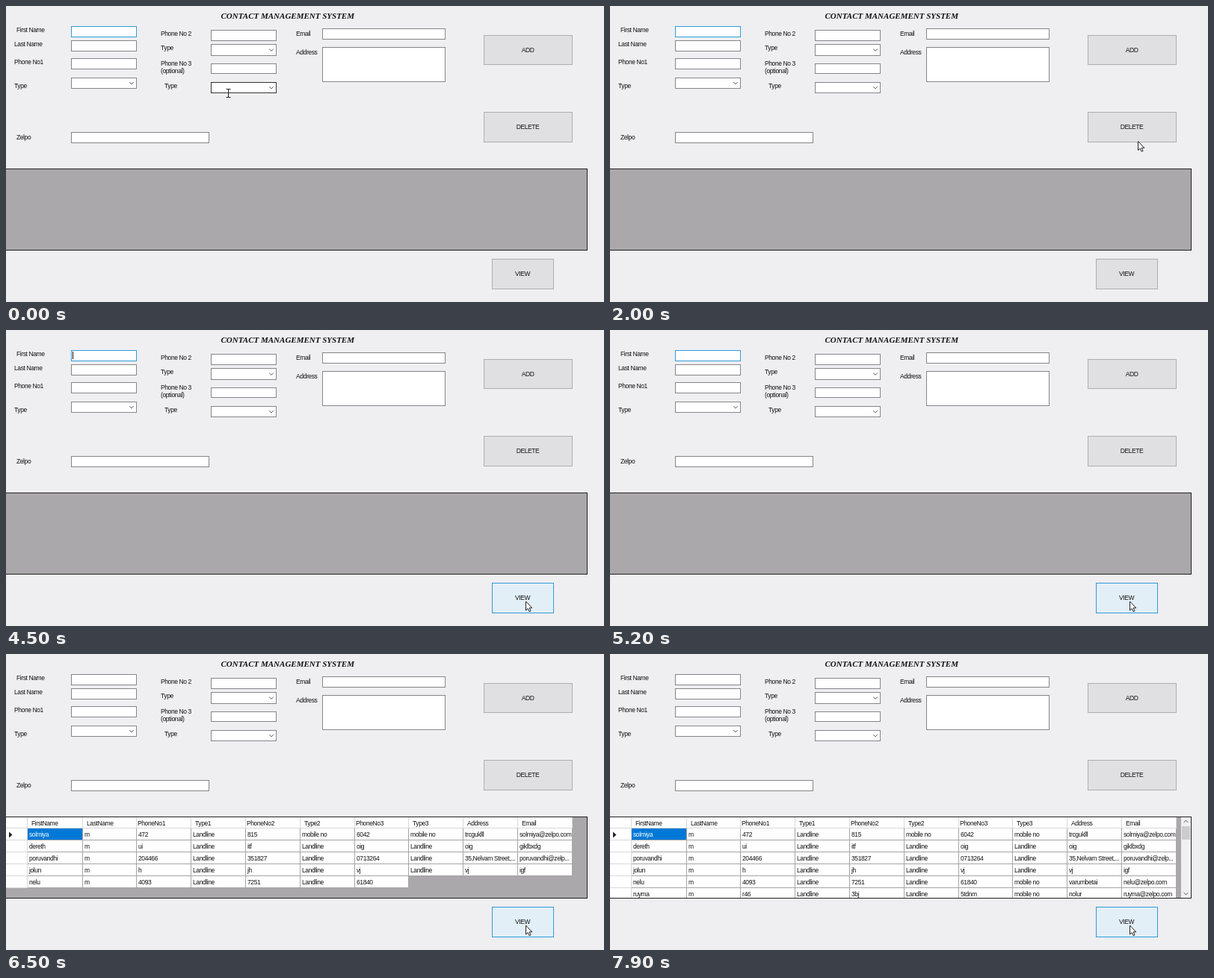
An HTML page with a canvas for the animation above (8 s loop, 800 by 397 pixels).

```html
<!DOCTYPE html>
<html lang="en">
<head>
<meta charset="utf-8">
<title>Contact Management System</title>
<style>
  html, body { margin: 0; width: 100%; height: 100%; overflow: hidden; background: #efeef0; }
  canvas { display: block; }
</style>
</head>
<body>
<canvas id="stage" width="800" height="397"></canvas>
<script>
const ctx = document.getElementById('stage').getContext('2d');
const LOOP = 8000, STEP = 100;
const PRESS = 5900, RELEASE = 6100, PAINT = 6300;
const BLUE = '#2f9cdb', GREY = '#868589';
const UI_FONT = '8.5px "Liberation Sans", Arial, sans-serif';

// time, x, y of the pointer tip
const path = [
  [0, 297.5, 116.5], [100, 318, 119], [500, 585, 146], [700, 590, 147],
  [1100, 622, 151], [1300, 622, 151], [1700, 700, 168], [2000, 706.5, 181.5],
  [2600, 706.5, 184], [2700, 699.5, 349.5], [3100, 698, 356],
  [3400, 698, 356], [4300, 695.5, 364], [LOOP, 695.5, 364]
];

const edges = [-1, 28, 102, 174, 247, 320, 393, 466, 538, 611, 684, 757];
const rows = [
  ['FirstName', 'LastName', 'PhoneNo1', 'Type1', 'PhoneNo2', 'Type2', 'PhoneNo3', 'Type3', 'Address', 'Email'],
  ['solmiya', 'm', '472', 'Landline', '815', 'mobile no', '6042', 'mobile no', 'trcguklll', 'solmiya@zelpo.com'],
  ['dereth', 'm', 'ui', 'Landline', 'itf', 'Landline', 'oig', 'Landline', 'oig', 'giklbxdg'],
  ['poruvandhi', 'm', '204466', 'Landline', '351827', 'Landline', '0713264', 'Landline', '35,Nelvam Street,...', 'poruvandhi@zelp...'],
  ['jolun', 'm', 'h', 'Landline', 'jh', 'Landline', 'vj', 'Landline', 'vj', 'igf'],
  ['nelu', 'm', '4093', 'Landline', '7251', 'Landline', '61840', 'mobile no', 'varumbetai', 'nelu@zelpo.com'],
  ['ruyma', 'm', 'r46', 'Landline', '3bj', 'Landline', '5tdnm', 'mobile no', 'nolur', 'ruyma@zelpo.com']
];

function fill(x, y, w, h, color) {
  ctx.fillStyle = color;
  ctx.fillRect(x, y, w, h);
}

function box(x, y, r, b, color = '#fff', border = GREY) {
  fill(x, y, r - x, b - y, border);
  fill(x + 1, y + 1, r - x - 2, b - y - 2, color);
}

function text(str, x, y, color = '#111', align = 'left') {
  ctx.font = UI_FONT;
  ctx.letterSpacing = '-0.4px';
  ctx.textAlign = align;
  ctx.fillStyle = color;
  ctx.fillText(str, x, y);
}

function chevron(x, y, dir, size) {
  ctx.strokeStyle = '#555';
  ctx.lineWidth = 1;
  ctx.beginPath();
  ctx.moveTo(x - size, y - dir * size / 2);
  ctx.lineTo(x, y + dir * size / 2);
  ctx.lineTo(x + size, y - dir * size / 2);
  ctx.stroke();
}

function combo(x, y, r, b, border) {
  box(x, y, r, b, '#fff', border);
  chevron(r - 7, (y + b) / 2, 1, 2.8);
}

function button(label, x, y, r, b, state) {
  const [color, border] = {
    idle: ['#e0dfe1', '#aeadaf'],
    hover: ['#e3eff7', BLUE],
    down: ['#cce4f7', '#005499']
  }[state];
  box(x, y, r, b, color, border);
  text(label, (x + r) / 2 - 0.5, (y + b) / 2 + 2.8, '#111', 'center');
}

function form(t) {
  ctx.font = 'italic bold 11px "Liberation Serif", "Times New Roman", serif';
  ctx.letterSpacing = '0px';
  ctx.textAlign = 'left';
  ctx.fillStyle = '#111';
  ctx.fillText('CONTACT MANAGEMENT SYSTEM', 287.5, 17);

  [['First Name', 14, 35], ['Last Name', 11, 54], ['Phone No1', 11, 78],
   ['Type', 11, 110], ['Phone No 2', 207, 40], ['Type', 207, 59],
   ['Phone No 3', 207, 80], ['(optional)', 207, 89.5], ['Type', 212, 110],
   ['Email', 388, 40], ['Address', 388, 65], ['Zelpo', 14, 179]
  ].forEach(([str, x, y]) => text(str, x, y));

  const focused = t < PRESS;
  box(87, 27, 175, 42, '#fff', focused ? BLUE : GREY);
  // the caret blinks every 530 ms
  if (focused && (t + 810) % 1060 < 530) fill(89, 29, 1, 10, '#111');
  box(87, 46, 175, 61);
  box(87, 70, 175, 85);
  combo(87, 96, 175, 111);
  box(274, 32, 362, 47);
  combo(274, 51, 362, 67);
  box(274, 77, 362, 91);
  combo(274, 102, 362, 117, t < 100 ? '#333' : GREY);
  box(423, 30, 588, 45);
  box(423, 55, 588, 102);
  box(87, 169, 272, 184);
}

function cell(r, c) {
  const x = edges[c], right = edges[c + 1];
  const y = r ? 218 + r * 16 : 219;
  const h = r ? 16 : 15;
  const header = !r || !c;
  const selected = r === 1 && c === 1;
  fill(x + 1, y, right - x, h, header ? '#d9d8da' : '#a5a4a6');
  fill(x + 1, y, right - x - 1, h - 1, selected ? '#0078d7' : '#fff');
  if (c) {
    const pad = r ? 3 : [3, 5, 7].includes(c) ? 2 : 6;
    text(rows[r][c - 1], x + pad, r ? y + 11 : 229.5, selected ? '#fff' : '#111');
  } else if (r === 1) {
    ctx.fillStyle = '#222';
    ctx.beginPath();
    ctx.moveTo(4, 238.5);
    ctx.lineTo(8.5, 242.5);
    ctx.lineTo(4, 246.5);
    ctx.fill();
  }
}

function scrollbar() {
  fill(764, 219, 13, 108, '#f0eff1');
  fill(765, 231, 11, 18, '#cccbcd');
  chevron(770.5, 224.5, -1, 2.8);
  chevron(770.5, 321.5, 1, 2.8);
}

function grid(t) {
  box(-2, 218, 778, 328, '#aaa8aa', '#222');
  if (t < PAINT) return;
  const total = rows.length * 11;
  const count = Math.min(total, 1 + Math.floor((t - PAINT) * 0.31));
  ctx.save();
  ctx.beginPath();
  ctx.rect(0, 219, 777, 108);
  ctx.clip();
  if (count === 1) fill(28, 219, 74, 1, '#d9d8da');
  for (let i = 0; i < count; i++) cell(Math.floor(i / 11), i % 11);
  if (count === total) scrollbar();
  ctx.restore();
}

function pointerAt(t) {
  const i = path.findIndex(p => p[0] > t);
  const [t0, x0, y0] = path[i - 1], [t1, x1, y1] = path[i];
  const k = (t - t0) / (t1 - t0);
  return [x0 + (x1 - x0) * k, y0 + (y1 - y0) * k];
}

function pointer(x, y, beam) {
  ctx.save();
  ctx.translate(x, y);
  ctx.lineWidth = 1;
  ctx.strokeStyle = '#222';
  ctx.beginPath();
  if (beam) {
    ctx.moveTo(-3, -5);
    ctx.lineTo(3, -5);
    ctx.moveTo(0, -5);
    ctx.lineTo(0, 6);
    ctx.moveTo(-3, 6);
    ctx.lineTo(3, 6);
  } else {
    [[0, 0], [0, 12], [2.7, 9.5], [4.6, 13.7], [6.5, 12.9], [4.7, 8.8], [8.3, 8.8]]
      .forEach(([px, py]) => ctx.lineTo(px, py));
    ctx.closePath();
    ctx.fillStyle = '#fff';
    ctx.fill();
  }
  ctx.stroke();
  ctx.restore();
}

function draw(now) {
  const t = Math.floor((now % LOOP) / STEP) * STEP;
  const [x, y] = pointerAt(t);
  const over = (l, top, r, b) => x >= l && x < r && y >= top && y < b;
  const hover = (...area) => over(...area) ? 'hover' : 'idle';

  fill(0, 0, 800, 397, '#efeef0');
  form(t);
  button('ADD', 639, 39, 758, 79, 'idle');
  button('DELETE', 639, 142, 758, 183, hover(639, 142, 758, 181));
  grid(t);
  const pressed = t >= PRESS && t < RELEASE;
  button('VIEW', 650, 339, 733, 380, pressed ? 'down' : hover(650, 339, 733, 380));
  pointer(x, y, t < 100);
}

function tick() {
  draw(performance.now());
  requestAnimationFrame(tick);
}
tick();
</script>
</body>
</html>
```
